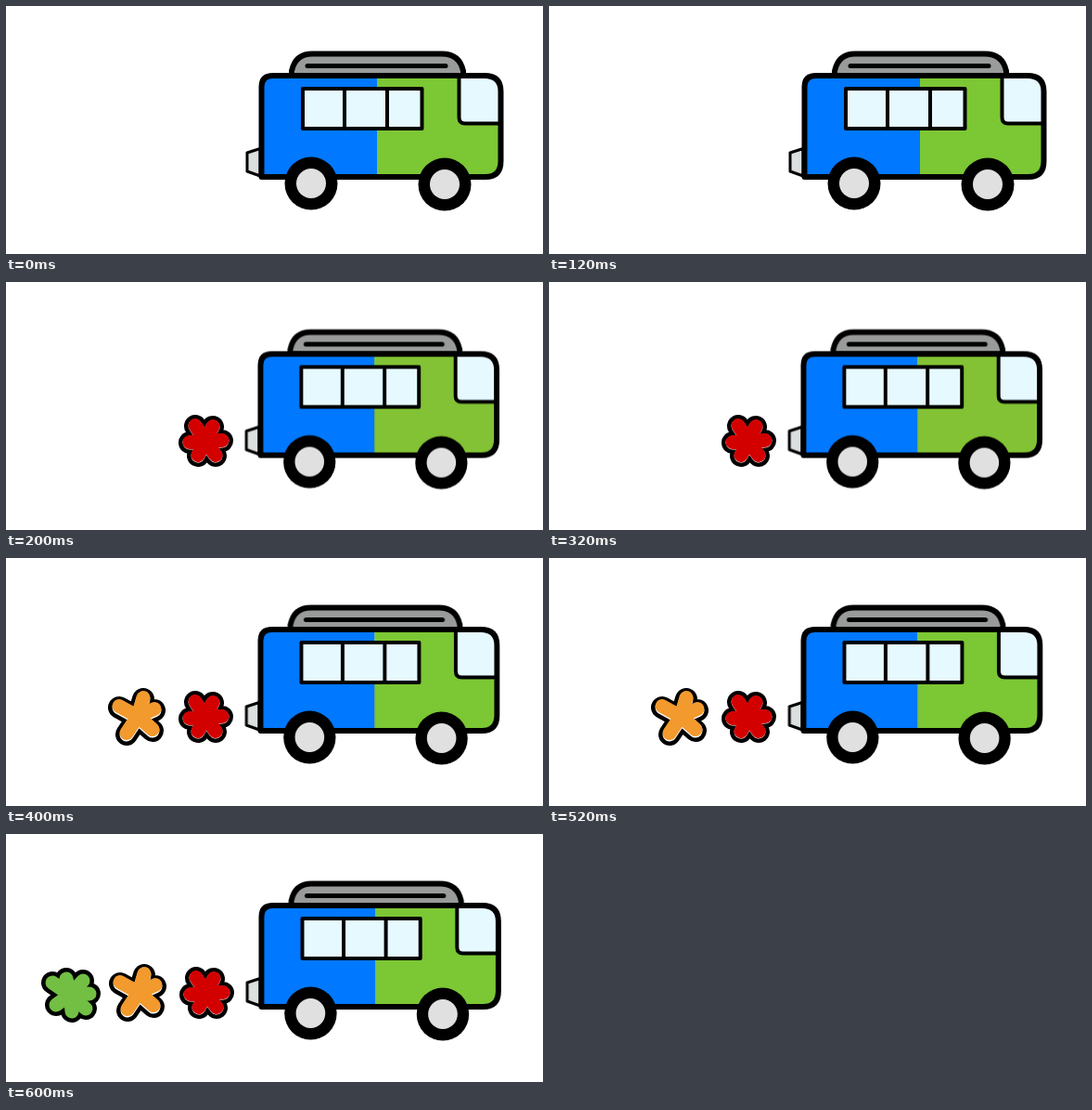
These frames come from a looping animation (579x267 px, 0.8 s). An HTML page:

```html
<!DOCTYPE html>
<html lang="en">
<head>
<meta charset="utf-8">
<title>Bus with puffs</title>
<style>
  html, body { margin: 0; width: 100%; height: 100%; overflow: hidden; background: #fff; }
  svg { display: block; width: 579px; height: 267px; }
  .bus, .puff, .side, .seam { animation: .8s step-end infinite; }
  .ink { fill: none; stroke: #000; stroke-linejoin: round; stroke-linecap: round; }
  .glass { fill: #e5f9ff; }
  .side { fill: #7cc734; animation-name: tint; }
  .seam { animation-name: seam; }
  .bus { animation-name: jolt; }
  .puff { fill: none; stroke-linecap: round; stroke-linejoin: round; }
  .rim { stroke: #000; stroke-width: 24px; }
  .gap { stroke: #fff; stroke-width: 15px; }
  .fill { stroke-width: 15px; }
  .red { animation-name: red; }
  .orange { animation-name: orange; }
  .green { animation-name: green; }

  @keyframes jolt {
    0%  { transform: none; }
    25% { transform: matrix(.987, 0, 0, 1, 2.5, 2.5); }
    50% { transform: matrix(.988, 0, 0, 1, 2.3, 2); }
    75% { transform: matrix(.99, 0, 0, 1, 2.7, 2); }
  }
  @keyframes tint { 0%, 50%, 75% { fill: #7cc734; } 25% { fill: #82c234; } }
  @keyframes seam { 0%, 75% { opacity: 0; } 25%, 50% { opacity: .6; } }
  @keyframes red {
    0%  { visibility: hidden; }
    25%, 50% { visibility: visible; transform: none; }
    75% { visibility: visible; transform: translateX(1px); }
  }
  @keyframes orange {
    0%  { visibility: hidden; }
    50% { visibility: visible; transform: none; }
    75% { visibility: visible; transform: translateX(1px); }
  }
  @keyframes green { 0% { visibility: hidden; } 75% { visibility: visible; } }
</style>
</head>
<body>
<svg viewBox="0 0 579 267">
  <defs>
    <path id="red" d="M204 155L215 172L223 156M233 171L215 172L226 187M207 187L215 172L198 173"/>
    <path id="orange" d="M148 152L142 172L122 161M130 190L142 172L158 186M160 164L142 172"/>
    <path id="green" d="M50 160L69 173L65 156M83 158L69 173L90 172M86 188L69 173L71 191M54 184L69 173"/>
    <g id="wheel">
      <circle r="28.5"/>
      <circle r="16" fill="#e0e0e0"/>
    </g>
  </defs>

  <g class="puff red">
    <use href="#red" class="rim"/>
    <use href="#red" class="gap"/>
    <use href="#red" class="fill" stroke="#d30000" y="-.5"/>
  </g>
  <g class="puff orange">
    <use href="#orange" class="rim"/>
    <use href="#orange" class="gap"/>
    <use href="#orange" class="fill" stroke="#f29a2e" y="-1.5"/>
  </g>
  <g class="puff green">
    <use href="#green" class="rim"/>
    <use href="#green" class="fill" stroke="#72bf44"/>
  </g>

  <g class="bus">
    <path class="ink" style="fill:#dcdfdf" stroke-width="3" d="M274 153.5L260 158V178L274 183Z"/>
    <path class="ink" style="fill:#999b9b" stroke-width="6" d="M308 75V70Q312 51.5 330 51.5H470Q489 51.5 493 70V75Z"/>
    <path class="ink" stroke-width="5" d="M325 64.5H474"/>

    <path fill="#0078ff" d="M275.5 184V87Q275.5 75 288 75H400V184Z"/>
    <path class="side" d="M400 75H516Q533.5 75 533.5 92V167Q533.5 184 517 184H400Z"/>
    <path class="ink seam" style="stroke:#4b7d70" stroke-width="1" d="M400 134V181"/>
    <path class="glass" d="M489 76H516Q533 75 533 92V126H496Q489 126 489 119Z"/>
    <path class="ink" stroke-width="4" d="M488.5 77V120Q488.5 126.5 495 126.5H531"/>
    <path class="ink" stroke-width="6" d="M275.5 184V87Q275.5 75 288 75H516Q533.5 75 533.5 92V167Q533.5 184 517 184Z"/>

    <path class="glass" d="M320 89H448.5V132H320Z"/>
    <path class="ink" stroke-width="4" d="M320 89H448.5V132H320ZM365 89V132M411 89V132"/>

    <use href="#wheel" x="329" y="191"/>
    <use href="#wheel" x="473" y="192"/>
  </g>
</svg>
</body>
</html>
```
